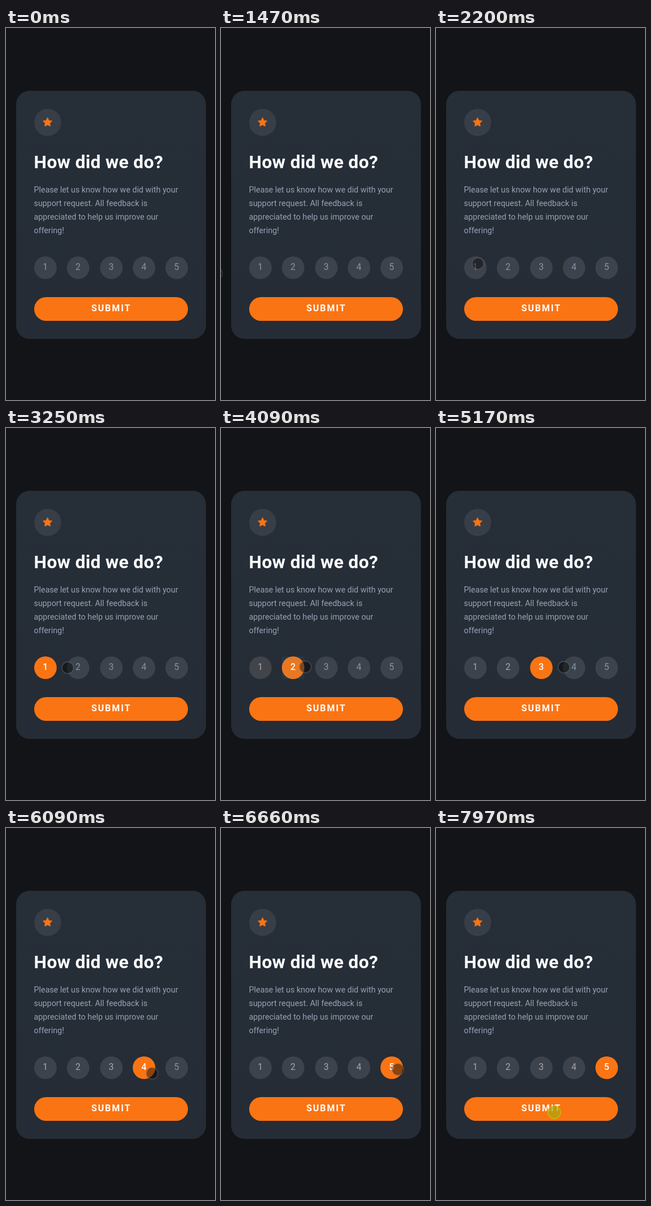
An HTML page that plays this animation: 371x658 px, repeating every 8000 ms.

```html
<!DOCTYPE html>
<html lang="en">
<head>
<meta charset="utf-8">
<title>Rating card</title>
<style>
  html, body { margin: 0; width: 100%; height: 100%; overflow: hidden; background: #121417; }
  svg { display: block; width: 371px; height: 658px; font-family: Roboto, "Open Sans", sans-serif; }
  .title { font-size: 32px; font-weight: 700; letter-spacing: .27px; fill: #fff; }
  .body { font-size: 14.35px; fill: #96a1b6; }
  .submit { font-size: 16px; font-weight: 700; letter-spacing: 2px; fill: #fff; }
  .digit { font-size: 16px; text-anchor: middle; }
  .star { fill: #fb7413; stroke: #fb7413; stroke-width: 1.4; stroke-linejoin: round; }
</style>
</head>
<body>
<svg viewBox="0 0 371 658">
  <defs>
    <linearGradient id="shade" x2="0" y2="1">
      <stop stop-color="#262e37"/><stop offset="1" stop-color="#252c35"/>
    </linearGradient>
  </defs>
  <rect x="18" y="111" width="337" height="439" rx="24" fill="url(#shade)"/>
  <circle cx="74" cy="167" r="24" fill="#383e48"/>
  <polygon class="star" id="star"/>
  <text class="title" x="49.6" y="248">How did we do?</text>
  <g id="copy" class="body"></g>
  <g id="ratings"></g>
  <rect x="50" y="476" width="273" height="42" rx="21" fill="#fb7413"/>
  <text class="submit" x="151.4" y="501">SUBMIT</text>
  <g id="pointer">
    <circle id="idle" r="10.3" fill="rgba(0,0,0,.43)" stroke="rgba(115,115,115,.5)" stroke-width="1.4"/>
    <circle id="pressed" r="11.2" fill="rgba(170,170,12,.7)" stroke="rgba(205,185,15,.8)" stroke-width="1.6"/>
  </g>
</svg>
<script>
const LOOP = 8000, FADE = 240;
const GREY = '#3c434c', ORANGE = '#fb7413';
const DIGIT = '#8495ab', USED = '#aca6a1', WHITE = '#fff';
const $ = id => document.getElementById(id);

function add(parent, tag, attrs, text = '') {
  const el = document.createElementNS('http://www.w3.org/2000/svg', tag);
  for (const key in attrs) el.setAttribute(key, attrs[key]);
  el.textContent = text;
  return parent.appendChild(el);
}

// Each step is [time, value, easing to the next step]; the ends are held.
function loop(el, prop, steps) {
  const all = [[0, steps[0][1]], ...steps, [LOOP, steps[steps.length - 1][1]]];
  const frames = all.map(([time, value, easing = 'linear']) =>
    ({ offset: time / LOOP, [prop]: value, easing }));
  return el.animate(frames, { duration: LOOP, iterations: Infinity });
}

$('star').setAttribute('points', Array.from({ length: 10 }, (_, i) => {
  const r = i % 2 ? 3.9 : 7.9, a = i * Math.PI / 5 - Math.PI / 2;
  return `${(73.7 + r * Math.cos(a)).toFixed(2)},${(167 + r * Math.sin(a)).toFixed(2)}`;
}).join(' '));

['Please let us know how we did with your', 'support request. All feedback is',
 'appreciated to help us improve our', 'offering!'
].forEach((line, i) => add($('copy'), 'text', { x: 49.5, y: 291 + 24 * i }, line));

const picks = [2960, 3900, 4840, 5690, 6420];
const animations = picks.flatMap((on, i) => {
  const x = Math.round(70 + 58.25 * i), off = picks[i + 1];
  const disc = add($('ratings'), 'circle', { cx: x, cy: 424, r: 20, fill: GREY });
  const tap = add($('ratings'), 'rect',
    { x: x - 20, y: 404, width: 40, height: 40, fill: '#33b5e5', opacity: 0 });
  const label = add($('ratings'), 'text',
    { class: 'digit', x: x - .2, y: 428.2, fill: DIGIT }, i + 1);
  const toggle = (idle, active, after) => [
    [on, idle, 'ease'], [on + FADE, active],
    ...(off ? [[off, active, 'ease'], [off + FADE, after]] : [])
  ];
  return [
    loop(disc, 'fill', toggle(GREY, ORANGE, GREY)),
    loop(label, 'fill', toggle(DIGIT, WHITE, USED)),
    loop(label, 'fontWeight', toggle(400, 500, 400)),
    loop(tap, 'opacity', [[on, 0], [on, .3], [on + FADE, 0]])
  ];
});

const at = (x, y) => `translate(${x}px, ${y}px)`;
const path = [
  [1440, -30, 434], [1470, -8, 434, 'cubic-bezier(.3,.3,.4,1)'], [2230, 74.5, 416.5],
  [2280, 74.5, 416.5, 'ease-out'], [2410, 77, 422], [2680, 77, 422], [2680, 77, 424],
  [3080, 77, 424, 'ease-in-out'], [3450, 152, 424],
  [3610, 152, 424, 'ease-in-out'], [3800, 139, 424],
  [4000, 139, 424, 'ease-in'], [4090, 149.5, 422.5, 'ease-out'], [4410, 187, 422],
  [4430, 187, 422], [4550, 193, 422],
  [4990, 193, 422, 'ease-in'], [5170, 227, 423, 'ease-out'], [5520, 246, 425],
  [5960, 246, 425, 'ease-in'], [6090, 259, 434, 'ease-out'], [6340, 314, 427],
  [6920, 314, 427, 'ease-in-out'], [7550, 210, 503]
];
animations.push(loop($('pointer'), 'transform',
  path.map(([time, x, y, easing]) => [time, at(x, y), easing])));

const presses = [[2880, 2980], [3800, 3920], [4750, 4860], [5600, 5710], [6420, 6510], [7970, LOOP]];
const press = (rest, down) => presses.flatMap(([from, to]) =>
  [[from, rest], [from, down], [to, down], ...(to < LOOP ? [[to, rest]] : [])]);
animations.push(loop($('idle'), 'opacity', press(1, 0)), loop($('pressed'), 'opacity', press(0, 1)));

// One shared start keeps every part in step.
const start = document.timeline.currentTime || 0;
animations.forEach(a => { a.startTime = start; });
</script>
</body>
</html>
```
